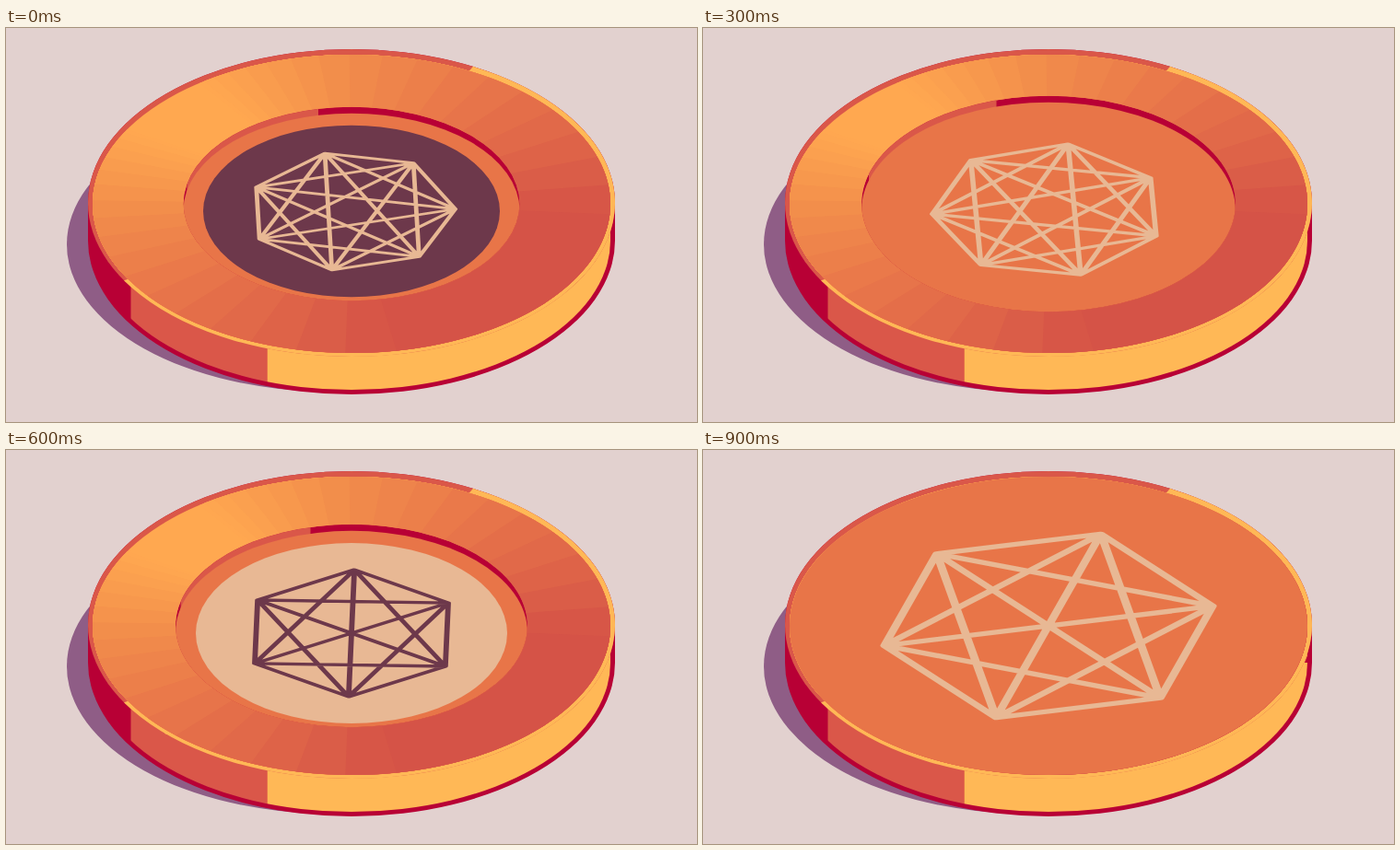
These frames come from a looping animation (750x428 px, 1.2 s). An HTML page:

```html
<!DOCTYPE html>
<html lang="en">
<head>
<meta charset="utf-8">
<title>Coin</title>
<style>
  html, body { margin: 0; width: 100%; height: 100%; overflow: hidden; background: #e2d1cf; }
  svg { display: block; width: 750px; height: 428px; }
  .pose { visibility: hidden; animation: show 1200ms step-end infinite; }
  @keyframes show {
    0% { visibility: visible; }
    25%, 100% { visibility: hidden; }
  }
</style>
</head>
<body>
<svg id="stage" viewBox="0 0 750 428">
  <defs>
    <clipPath id="side"><path d="M94 190V231A281 162 0 0 0 656 231V190Z"/></clipPath>
  </defs>
  <ellipse cx="352" cy="235" rx="286" ry="160" fill="#8f5d86"/>
  <path d="M89 190A286 167 0 0 1 661 190V231A286 167 0 0 1 89 231Z" fill="#b80035"/>
  <g clip-path="url(#side)">
    <rect x="135.5" y="190" width="148" height="210" fill="#da5749"/>
    <rect x="283.5" y="190" width="380" height="210" fill="#ffb856"/>
  </g>
</svg>
<script>
  const stage = document.getElementById('stage');
  const CX = 375, CY = 191, TILT = 0.577;
  const ORANGE = '#e87548', SAND = '#e8b894', PLUM = '#6d384b';
  const RED = '#da5749', CRIMSON = '#b80035', YELLOW = '#ffb856';

  function add(parent, tag, attrs = {}) {
    const el = document.createElementNS('http://www.w3.org/2000/svg', tag);
    for (const name in attrs) el.setAttribute(name, attrs[name]);
    return parent.appendChild(el);
  }

  const ellipse = (parent, cy, rx, ry, fill) =>
    add(parent, 'ellipse', { cx: CX, cy, rx, ry, fill });

  // Group whose flat coordinates are tilted into the coin's plane
  const plane = (parent, cy, tilt = TILT) =>
    add(parent, 'g', { transform: `translate(${CX} ${cy}) scale(1 ${tilt})` });

  function polar(r, deg) {
    const a = deg * Math.PI / 180;
    return [(r * Math.cos(a)).toFixed(2), (r * Math.sin(a)).toFixed(2)];
  }

  function sector(parent, r, from, to, fill) {
    const large = to - from > 180 ? 1 : 0;
    add(parent, 'path', {
      d: `M0 0L${polar(r, from)}A${r} ${r} 0 ${large} 1 ${polar(r, to)}Z`, fill
    });
  }

  // Face shade by angular distance from the darkest direction
  const SHADES = [[38, 213, 83, 71], [99, 232, 118, 74], [135, 242, 141, 75], [168, 255, 168, 80]];

  function shade(d) {
    let i = 1;
    while (i < SHADES.length - 1 && d > SHADES[i][0]) i++;
    const a = SHADES[i - 1], b = SHADES[i];
    const t = Math.min(1, Math.max(0, (d - a[0]) / (b[0] - a[0])));
    return `rgb(${[1, 2, 3].map(c => Math.round(a[c] + (b[c] - a[c]) * t))})`;
  }

  function shadedFace(parent) {
    const steps = 18, dark = 42;
    const edge = k => 38 + 130 * (1 - Math.pow(1 - k / steps, 1.6));
    ellipse(parent, CY, 281, 162, shade(168));
    const g = plane(parent, CY, 162 / 281);
    for (let k = steps; k >= 0; k--) {
      const mid = k ? (edge(k) + edge(k - 1)) / 2 : 38;
      sector(g, 281, dark - edge(k), dark + edge(k), shade(mid));
    }
  }

  function hole(parent, rx, id) {
    const ry = rx * TILT, left = CX - rx;
    const clip = add(parent, 'clipPath', { id });
    ellipse(clip, CY, rx, ry, '#000');
    const g = add(parent, 'g', { 'clip-path': `url(#${id})` });
    ellipse(g, CY, rx, ry, CRIMSON);
    const start = left + (rx - 163) * 0.2;
    add(g, 'rect', { x: start, y: 60, width: left + 146.5 - start, height: 131, fill: RED });
    ellipse(g, CY + 7, rx, ry, ORANGE);
  }

  // Regular polygon with every vertex joined to every other
  function web(parent, { n, r, turn, width, color, cy }) {
    const pts = Array.from({ length: n }, (_, i) => polar(r, turn + i * 360 / n));
    let d = `M${pts.join('L')}Z`;
    for (let i = 0; i < n; i++)
      for (let j = i + 2; j < n; j++) d += `M${pts[i]}L${pts[j]}`;
    add(plane(parent, cy), 'path', {
      d, fill: 'none', stroke: color, 'stroke-width': width, 'stroke-linejoin': 'round'
    });
  }

  const ring = plane(stage, 190, 167 / 286);
  add(ring, 'circle', { r: 286, fill: RED });
  sector(ring, 286, -62.5, 149.7, YELLOW);

  shadedFace(stage);

  const poses = [
    { hole: 182.5, disc: [161, 93.3, PLUM],
      web: { n: 7, r: 112.8, turn: -2, width: 4.8, color: SAND, cy: 199 } },
    { hole: 203,
      web: { n: 7, r: 126.5, turn: 22.5, width: 5.6, color: SAND, cy: 198 } },
    { hole: 191, disc: [169, 98, SAND],
      web: { n: 6, r: 119.5, turn: -28.5, width: 5.8, color: PLUM, cy: 199 } },
    { web: { n: 6, r: 182, turn: -11.8, width: 9, color: SAND, cy: 191 } }
  ];

  poses.forEach((pose, i) => {
    const g = add(stage, 'g', { class: 'pose' });
    g.style.animationDelay = `${(i - poses.length) * 300}ms`;
    if (pose.hole) {
      hole(g, pose.hole, `hole${i}`);
    } else {
      ellipse(g, CY, 281, 162, ORANGE);
      add(g, 'path', { d: 'M656.5 222V231H653Z', fill: CRIMSON });
    }
    if (pose.disc) {
      const [rx, ry, fill] = pose.disc;
      ellipse(g, 199, rx, ry, fill);
    }
    web(g, pose.web);
  });
</script>
</body>
</html>
```
